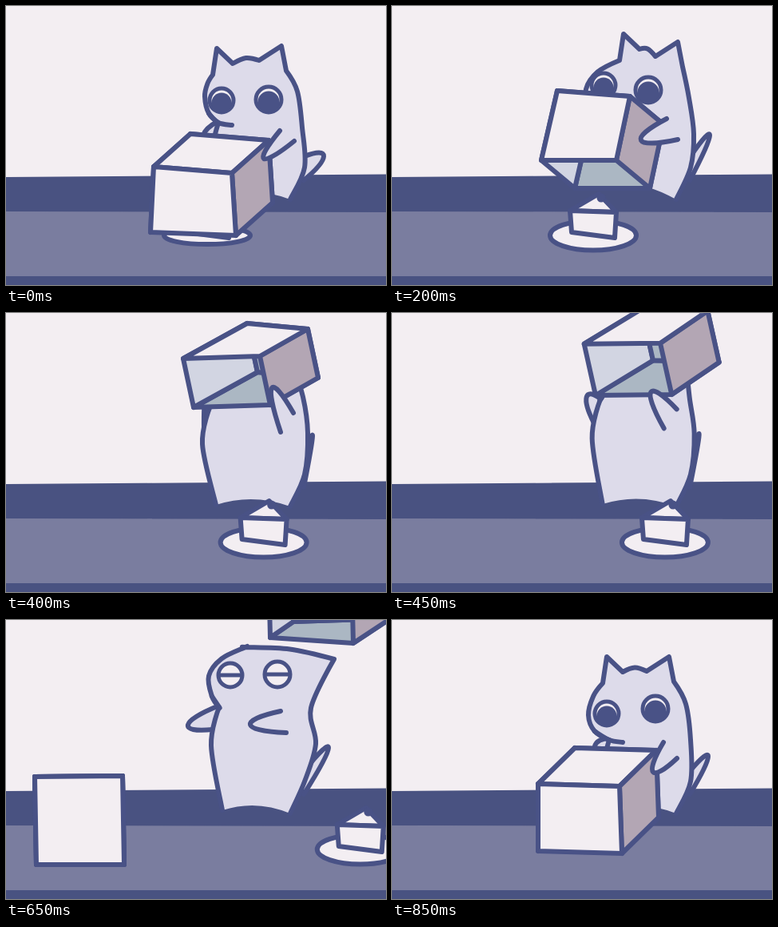
Recreate the animation shown at these times as an HTML page. Size 476x349 px, loop 900 ms.

```html
<!DOCTYPE html>
<html lang="en">
<head>
<meta charset="utf-8">
<title>Cat and boxes</title>
<style>
html, body { margin: 0; width: 100%; height: 100%; overflow: hidden; background: #f3eef2; }
svg { display: block; width: 476px; height: 349px; }
</style>
</head>
<body>
<svg viewBox="0 0 476 349" xmlns="http://www.w3.org/2000/svg">
  <rect width="476" height="349" fill="#f3eef2"/>
  <path d="M0 214L476 210.5V349H0Z" fill="#495281"/>
  <path d="M0 257L476 258V338H0Z" fill="#7a7d9f"/>
  <g id="art" stroke="#495286" stroke-width="6" stroke-linejoin="round" stroke-linecap="round" fill="none"></g>
</svg>
<script>
const WHITE = '#f3eef2', FUR = '#dddbea', INK = '#495286';
const SHADE = '#b3a6b4', INNER = '#d2d5e2', FLOOR = '#abb7c3';
const STEP = 50, STEPS = 18;

const add = (p, x, y) => [p[0] + x, p[1] + y];
const sum = (p, q) => add(p, q[0], q[1]);
const mix = (p, q, kx, ky = kx) => [p[0] + (q[0] - p[0]) * kx, p[1] + (q[1] - p[1]) * ky];
const parse = s => s.split(' ').map(p => p.split(',').map(Number));

// Key points by step, linear between them; a looping track returns to its first key.
function track(keys, loop = true) {
  const list = Object.entries(keys).map(([t, s]) => ({ t: +t, pts: parse(s) }));
  list.sort((a, b) => a.t - b.t);
  if (loop) list.push({ t: STEPS, pts: list[0].pts });
  return t => {
    let i = list.length - 2;
    while (i > 0 && list[i].t > t) i--;
    const a = list[i], b = list[i + 1], k = (t - a.t) / (b.t - a.t);
    return a.pts.map((p, n) => mix(p, b.pts[n], k));
  };
}

const cat = {
  foot: track({ 0: '267,239', 4: '265,222', 8: '263,240', 11: '265,237', 13: '271,238', 15: '272,241' }),
  // chin, cheek, left ear tip, right ear tip, back
  head: track({
    0: '266,146 249,113 264,53 345,50 365,107',
    4: '255,135 243,104 290,35 358,45 372,115',
    8: '256,116 262,100 290,70 360,70 372,105',
    11: '270,95 275,66 305,42 385,45 374,107',
    13: '267,109 254,70 300,34 411,49 382,110',
    15: '266,139 241,106 270,32 348,31 371,97',
    17: '272,150 246,119 269,46 347,46 368,105'
  }),
  ear: track({ 0: '1,1', 4: '1,1', 8: '0,0', 13: '0,0', 15: '1,1' }),
  eyes: track({
    0: '270,118 329,117', 4: '265,99 321,105', 8: '272,86 329,88', 11: '312,45 345,45',
    13: '281,69 340,68', 15: '270,94 329,92', 17: '269,117 330,111'
  }),
  // shoulder, paw, elbow
  near: track({
    0: '343,156 323,191 361,169', 4: '344,141 312,168 358,167', 8: '360,125 333,94 344,149',
    11: '350,111 307,109 334,135', 13: '344,114 306,131 351,141',
    15: '343,140 321,178 352,163', 17: '340,153 327,190 357,173'
  }),
  // far paw, tail tip
  tips: track({
    0: '247,162 398,188', 4: '250,150 398,162', 8: '250,105 384,154', 11: '231,106 386,149',
    13: '228,131 404,160', 15: '246,178 401,166', 17: '254,158 396,171'
  })
};

// Front corners clockwise from top left, then the depth vector.
const boxAt = track({
  '-5': '36,196 146,195 148,306 38,306 0,0',
  '-3': '118,204 217,204 217,298 120,292 24,-20',
  '-1': '183,205 285,208 288,292 183,289 46,-45',
  0: '185,201 283,209 288,287 181,283 46,-41',
  4: '207,106 298,113 281,193 187,193 42,35',
  8: '302,13 378,20 318,54 222,57 13,61',
  11: '334,-41 430,-48 372,5 278,2 17,71',
  13: '358,-83 480,-87 433,-56 329,-63 2,85'
}, false);

const poly = (...pts) => 'M' + pts.join('L') + 'Z';

// Smooth curve through points; listed indices stay sharp.
function curve(pts, sharp = []) {
  const slope = i => {
    if (sharp.includes(i)) return [0, 0];
    const a = pts[Math.max(i - 1, 0)], b = pts[Math.min(i + 1, pts.length - 1)];
    return [(b[0] - a[0]) / 6, (b[1] - a[1]) / 6];
  };
  let d = 'M' + pts[0];
  for (let i = 1; i < pts.length; i++) {
    const s = slope(i - 1), t = slope(i);
    d += `C${sum(pts[i - 1], s)} ${add(pts[i], -t[0], -t[1])} ${pts[i]}`;
  }
  return d;
}

// Round-ended limb from a to b whose bend reaches the tip.
function limb(a, tip, b) {
  const c = [0, 1].map(i => (8 * tip[i] - a[i] - b[i]) / 6);
  const x = (a[0] - b[0]) / 4, y = (a[1] - b[1]) / 4;
  return `M${a}C${add(c, x, y)} ${add(c, -x, -y)} ${b}`;
}

const art = document.getElementById('art');
function make(tag, attrs, parent = art) {
  const el = document.createElementNS('http://www.w3.org/2000/svg', tag);
  parent.appendChild(el);
  return set(el, attrs);
}
function set(el, attrs) {
  for (const k in attrs) el.setAttribute(k, attrs[k]);
  return el;
}
const shape = (fill, extra) => make('path', { fill, ...extra });

const tail = shape(FUR), far = shape(FUR);
const fur = shape(FUR, { stroke: 'none' }), outline = shape('none'), mouth = shape('none');
const eyes = [15, 16].map(r => {
  const g = make('g', { 'stroke-width': 5 });
  make('circle', { r, fill: WHITE }, g);
  return {
    g,
    pupil: make('circle', { cy: 3, r: r - 2.5, fill: INK, stroke: 'none' }, g),
    lid: make('path', { d: `M${2 - r} 0H${r - 2}` }, g)
  };
});

const dish = make('g', {});
const plate = make('ellipse', { rx: 54, fill: WHITE }, dish);
make('path', { d: 'M-29-31L7-52L29-29Z', fill: WHITE }, dish);
make('path', { d: 'M-29-31L29-29L27 3L-27-4Z', fill: WHITE }, dish);
make('circle', { cx: 10, cy: -47, r: 5.5, fill: INK, stroke: 'none' }, dish);

const boxes = [0, 1].map(() => [FLOOR, INNER, WHITE, SHADE, WHITE].map(c => shape(c)));
const near = shape(FUR);

function drawCat(step) {
  const [foot] = cat.foot(step), [[ear]] = cat.ear(step);
  const [chin, cheek, earL, earR, back] = cat.head(step);
  const from = (tip, x, y) => add(tip, x * ear, y * ear);
  const outL = from(earL, -5, 33), inL = from(earL, 20, 19);
  const inR = from(earR, -28, 18), outR = from(earR, 6, 31);
  const jaw = mix(cheek, chin, 0.3, 0.65), heel = [356, 242];
  const pts = [
    foot, add(chin, -10, 48), chin, jaw, cheek, mix(cheek, outL, 0.35, 0.6),
    outL, earL, inL, add(mix(inL, inR, 0.5), 0, -5), inR, earR, outR,
    back, add(back, 6, 45), [374, 202], heel
  ];
  const edge = curve(pts, ear ? [2, 6, 7, 8, 10, 11, 12] : [2, 10, 11, 12]);
  set(outline, { d: edge });
  set(fur, { d: `${edge}Q${add(mix(foot, heel, 0.5), 0, -16)} ${foot}Z` });
  set(mouth, { d: curve([jaw, chin, from(chin, 17, 3)]) });

  const [paw, tip] = cat.tips(step);
  set(far, { d: limb(add(chin, 0, -2), paw, add(chin, -8, 28)) });
  set(tail, { d: limb([374, 188], tip, [373, 218]) });
  set(near, { d: limb(...cat.near(step)) });

  const shut = step >= 12 && step <= 15;
  const tilt = 12 * Math.max(0, step - 13);
  cat.eyes(step).forEach((p, i) => {
    set(eyes[i].g, { transform: `translate(${p})` });
    set(eyes[i].pupil, { visibility: shut ? 'hidden' : 'visible' });
    set(eyes[i].lid, {
      visibility: shut ? 'visible' : 'hidden',
      transform: `rotate(${i ? tilt : -tilt})`
    });
  });
}

function drawBox(faces, t) {
  const [a, b, c, d, depth] = boxAt(t);
  const [e, f, g, h] = [a, b, c, d].map(p => sum(p, depth));
  const sides = [[e, f, g, h], [d, a, e, h], [a, b, f, e], [b, f, g, c], [a, b, c, d]];
  sides.forEach((s, i) => set(faces[i], { d: t < -6 ? '' : poly(...s) }));
  // the lid is seen from outside until the box tips back
  set(faces[2], { fill: depth[1] < 0 ? WHITE : FLOOR });
}

function draw(step) {
  drawCat(step);
  const s = Math.max(0, step - 4);
  set(dish, {
    transform: `translate(${252 + 17.3 * s + 0.0055 * s ** 4} 287)`,
    visibility: step < 15 ? 'visible' : 'hidden'
  });
  set(plate, { ry: 18.5 * Math.min(1, 0.6 + step / 10) });
  drawBox(boxes[0], step);
  drawBox(boxes[1], step - STEPS);
}

let shown = -1;
const start = performance.now();
function tick() {
  const step = Math.floor((performance.now() - start) / STEP) % STEPS;
  if (step !== shown) draw(shown = step);
  requestAnimationFrame(tick);
}
tick();
</script>
</body>
</html>
```
